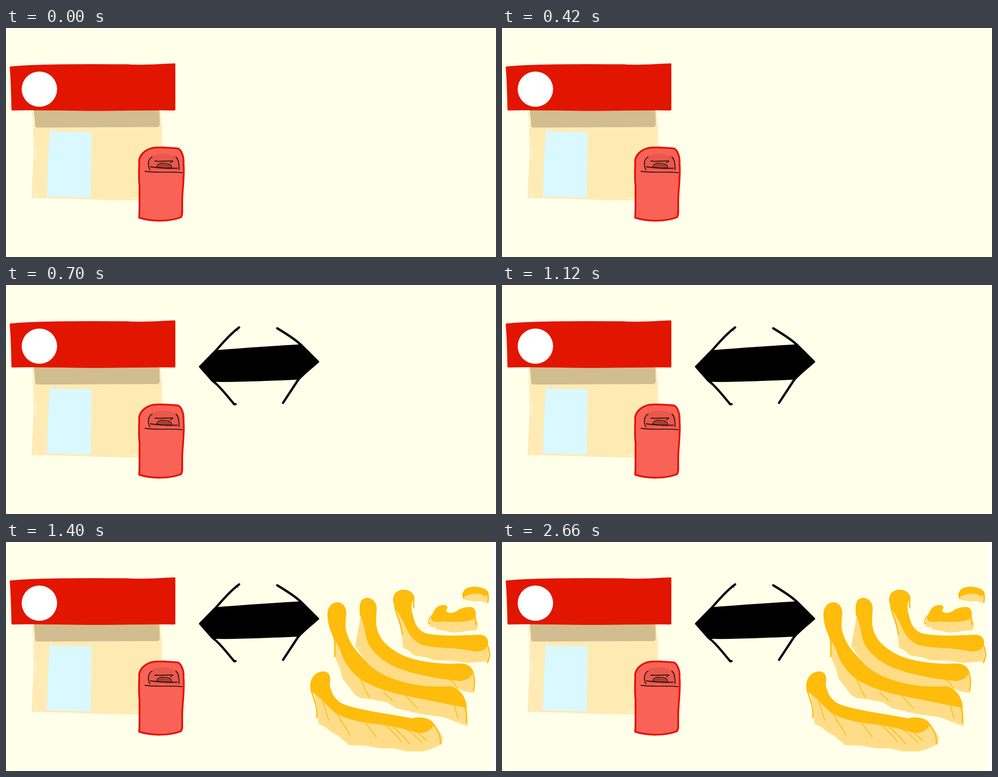
Recreate the animation shown at these times as an HTML page. Size 1093 px wide and 513 px high, loop 3.5 s.

```html
<!DOCTYPE html>
<html lang="en">
<head>
<meta charset="utf-8">
<title>Shop, arrow, fries</title>
<style>
  html, body { margin: 0; width: 100%; height: 100%; overflow: hidden; background: #ffffea; }
  svg { display: block; width: 100%; height: 100%; }
  path { stroke-linecap: round; stroke-linejoin: round; }
  .sign { fill: #e21500; stroke: #e21500; stroke-width: 3.5; }
  .box { fill: #fb6257; stroke: #e21500; stroke-width: 4; }
  .ink { fill: none; stroke: #1c0b08; stroke-width: 1.8; }
  .slot { fill: #a93e35; stroke: #1c0b08; stroke-width: 1.2; }
  .speck { fill: none; stroke: #fff8d8; stroke-width: 2; }
  .barb { fill: none; stroke: #000; stroke-width: 5; }
  .side { fill: #ffdd88; stroke: #ffdd88; stroke-width: 4; }
  .top { fill: #febc0c; }
  .crease { fill: none; stroke: #febc0c; stroke-width: 2; }
  .edge { fill: none; stroke: #febc0c; stroke-width: 3; }
  #arrow { animation: second 3.5s step-end infinite; }
  #fries { animation: third 3.5s step-end infinite; }
  @keyframes second { 0% { visibility: hidden; } 20%, 100% { visibility: visible; } }
  @keyframes third { 0% { visibility: hidden; } 40%, 100% { visibility: visible; } }
</style>
</head>
<body>
<svg viewBox="0 0 1093 513" preserveAspectRatio="none">
  <g id="shop">
    <path fill="#feebb4" d="M59 186H344L348 225 347 270 300 290V386C220 387 140 381 62 381L57 383C59 330 63 290 61 238Z"/>
    <path class="speck" d="M66 264L65 292M64 372L69 377M284 381L296 380M63 188L62 215M343 265H346"/>
    <path fill="#d2bd90" d="M62 184H342L343 217Q341 223 335 222L70 223Q64 223 65 216Z"/>
    <path fill="#daf8ff" d="M98 226Q101 232 106 232L191 234 189 380 90 377C95 340 92 295 96 262Z"/>
    <path class="sign" d="M10 88C55 83 150 82 270 83 310 86 340 82 376 81L376 183C330 182 260 184 200 184 130 184 60 181 14 183 13 150 13 120 10 88Z"/>
    <circle cx="74.5" cy="137" r="39.5" fill="#fff"/>
  </g>

  <g id="mailbox">
    <path class="box" d="M297 425C299 400 297 380 298 355 295 330 298 310 297 296 300 279 318 269 333 268 350 266 370 269 384 270 393 275 397 290 396 305 399 330 392 370 393 395 393 410 394 420 390 424 365 434 325 434 297 425Z"/>
    <path fill="#e9584d" d="M318 318C316 300 320 289 333 284 350 278 372 282 385 291L388 320Z"/>
    <path class="slot" d="M336 311C338 303 347 302 355 303 363 303 370 307 370 313 358 314 345 314 336 311Z"/>
    <path class="ink" d="M326 289C315 295 316 309 321 318M379 289C386 296 386 307 386 317M332 298C345 300 360 297 372 298L367 302M322 311C345 314 365 315 382 314M310 321C335 325 365 321 393 324"/>
  </g>

  <g id="arrow">
    <path d="M432 183L469 146C530 141 600 136 656 133L697 172 655 212C600 214 520 218 461 217Z"/>
    <path class="barb" d="M520 95C500 110 485 128 468 147L433 183 461 215C478 227 495 251 509 267L512 267M605 97C625 109 645 122 658 134L696 172C675 191 660 200 650 215L618 264"/>
    <circle cx="517" cy="102.5" r="1"/>
  </g>

  <g id="fries">
    <path fill="#fff" d="M1084 0H1093V513H1084Z"/>

    <path class="side" d="M1020 119L1022 127 1045 131 1058 130 1074 135V113L1045 106Z"/>
    <path class="top" d="M1018 122C1017 106 1030 100 1045 100 1060 101 1070 104 1076 112 1076 121 1070 124 1062 118 1045 113 1030 118 1022 123Z"/>
    <path class="edge" d="M1019 117L1021 126M1074 113C1077 120 1076 127 1075 134"/>

    <path class="side" d="M950 172L946 187 958 190 962 194 1000 201 1025 198 1049 195 1051 183 1044 168Z"/>
    <path class="top" d="M949 168C954 149 965 140 978 141 987 143 986 150 981 153 984 160 995 161 1005 155 1015 147 1030 144 1042 147 1050 154 1050 168 1043 173 1020 183 990 177 965 179 952 180 946 176 949 168Z"/>
    <path class="edge" d="M950 165C943 172 942 177 944 183M1046 166L1049 185"/>

    <path class="side" d="M870 145L884 193 887 235 900 242 910 252 935 256 960 263 1000 264 1030 269 1073 265 1075 234 930 218Z"/>
    <path class="top" d="M863 131C864 112 876 107 887 107 902 107 911 116 911 127 903 135 903 146 907 162 913 188 922 202 943 206 980 212 1020 209 1050 208 1070 206 1077 216 1075 229 1072 243 1057 248 1040 244 1000 236 960 239 930 231 908 223 898 205 889 185 881 165 867 150 863 131Z"/>
    <path class="edge" d="M867 142C870 165 882 180 884 208M909 122C911 131 908 137 910 147M1073 230C1081 245 1080 257 1074 270"/>

    <path class="side" d="M794 162L787 200 781 233 796 253 806 273 840 300 875 316 905 324 950 328 1000 325 1022 332 1043 336 1043 300 920 285 850 260 815 220Z"/>
    <path class="top" d="M789 152C788 132 795 125 806 125 820 126 828 138 827 152 823 185 827 203 840 220 860 245 890 259 925 266 955 272 990 274 1010 272 1028 271 1042 280 1041 294 1035 309 1015 314 1000 310 960 306 920 298 890 288 850 276 826 255 811 233 799 211 802 185 789 163Z"/>
    <path class="edge" d="M1040 288C1046 305 1046 315 1043 332"/>
    <path class="crease" d="M990 308C998 313 1002 319 1006 327"/>

    <path class="side" d="M735 215L737 261 748 286 752 305 766 322 781 342 790 347 812 350 850 357 870 370 890 375 930 384 975 390 1010 403 1028 410 1026 362 900 332 800 295 755 235Z"/>
    <path class="top" d="M717 166C716 145 728 135 738 135 752 135 761 148 759 163 756 185 757 200 765 217 775 240 790 252 803 268 825 293 860 308 900 317 930 324 965 325 990 323 1010 327 1027 345 1027 371 990 365 945 355 900 346 865 339 828 329 798 312 772 296 756 272 748 250 742 225 721 212 717 166Z"/>
    <path class="edge" d="M724 192C734 215 735 230 733 257M1023 370C1028 382 1028 393 1027 404"/>
    <path class="crease" d="M792 309C798 322 803 337 811 348M843 337L862 356M894 347L918 373M1000 364L1008 395"/>

    <path class="side" d="M687 335L698 372 697 392 700 406 715 414 725 423 742 432 766 453 800 454 835 460 865 460 895 467 930 467 950 461 971 452 972 437 954 408 800 390 720 352Z"/>
    <path class="top" d="M679 326C677 301 695 289 709 290 722 291 725 302 722 318 725 340 735 355 752 363 790 378 850 384 905 395 930 389 951 397 954 408 950 425 930 430 915 427 890 418 860 412 820 407 780 402 747 394 730 379 714 364 706 355 695 345 685 338 681 334 679 326Z"/>
    <path class="edge" d="M680 325C683 350 697 365 693 393M953 408C964 422 970 436 969 451"/>
    <path class="crease" d="M705 357C715 372 712 384 721 400M739 386C748 404 760 416 767 432M803 406C810 418 820 427 826 438M848 411C860 423 873 434 882 448M861 411C875 426 890 438 901 452M890 417C904 426 917 438 928 450M919 427L938 445"/>
  </g>
</svg>
</body>
</html>
```
